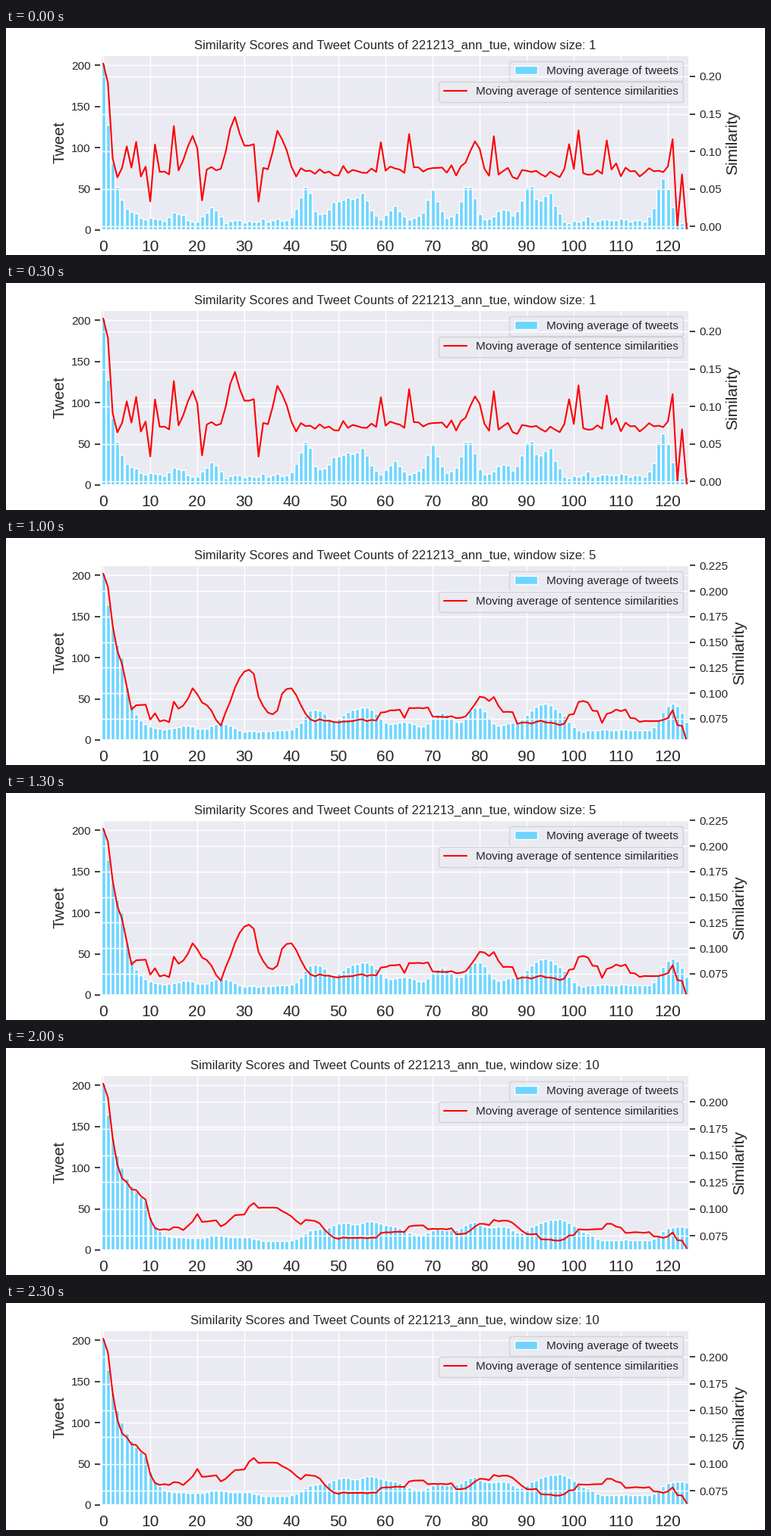
Write a matplotlib script that moves like this. It is 1000x300 px and loops after 2.5 s.

```python
import matplotlib.pyplot as plt
import numpy as np
from matplotlib.animation import FuncAnimation

INK = ".15"
plt.rcParams.update({
    "font.family": "Liberation Sans", "font.size": 12, "text.color": INK,
    "axes.facecolor": "#EAEAF2", "axes.edgecolor": "white", "axes.linewidth": 1.25,
    "axes.labelcolor": INK, "axes.labelsize": 15, "axes.titlesize": 12,
    "axes.grid": True, "axes.axisbelow": True,
    "grid.color": "white", "grid.linewidth": 1,
    "lines.linewidth": 1.5, "lines.solid_capstyle": "round",
    "patch.linewidth": 1, "patch.edgecolor": "white", "patch.force_edgecolor": True,
    "xtick.bottom": False, "xtick.color": INK, "xtick.labelsize": 15,
    "ytick.color": INK, "ytick.labelsize": 11,
    "xtick.major.size": 6, "ytick.major.size": 6, "ytick.major.width": 1.25,
    "legend.fontsize": 11,
})

# Window size and the lowest smoothed similarity, which sets the right axis
WINDOWS = [(1, 0.006), (3, 0.0385), (5, 0.062), (7, 0.0675), (10, 0.069)]
TOP_TWEETS, TOP_SIMILARITY = 202, 0.2175
MARGIN = 0.05

x = np.arange(125)
rng = np.random.default_rng(7)


def bumps(peaks, width):
    """Sum of bell curves given as (centre, height)."""
    return sum(h * np.exp(-((x - c) / width) ** 2) for c, h in peaks)


def jitter(spread):
    """Random wobble that leaves the opening peak untouched."""
    return np.where(x > 1, rng.normal(0, spread, x.size), 0)


def make_tweets():
    bursts = [(16, 10), (23, 15), (43, 40), (48.5, 14), (51.5, 26), (55, 31),
              (62, 17), (70, 35), (77.5, 44), (85, 15), (90.5, 42), (94.7, 32),
              (119, 50)]
    decay = (TOP_TWEETS - 12) * np.exp(-x / 2)
    return np.maximum(12 + decay + bumps(bursts, 1.9) + jitter(2), 4)


def make_similarity():
    swells = [(19, 50), (27.8, 72), (31.6, 42), (37.6, 52), (79, 30)]
    spikes = [(5, 37), (7, 38), (10, -48), (11, 36), (15, 54), (21, -60),
              (33, -72), (59, 39), (65, 56), (83, 42), (99, 36), (101, 59),
              (107, 39), (121, 43), (122, -62), (124, -68)]
    opening = bumps([(0.4, 168)], 1)
    return (74 + opening + bumps(swells, 1.8) + bumps(spikes, 0.45) + jitter(5)) / 1000


def moving_average(values, window):
    """Trailing mean; the first points use whatever history exists."""
    return [values[max(0, i - window + 1):i + 1].mean() for i in x]


tweets = make_tweets()
similarity = make_similarity()
fig = plt.figure(figsize=(10, 3), dpi=100)


def draw(frame):
    window, low = WINDOWS[frame]
    fig.clear()

    ax = fig.add_subplot()
    ax.bar(x, moving_average(tweets, window), color="#6ed5ff",
           label="Moving average of tweets")
    ax.set_xlim(-0.5, x.size - 0.5)
    ax.set_ylim(0, TOP_TWEETS * (1 + MARGIN))
    ax.set_xticks(range(0, x.size, 10))
    ax.set_ylabel("Tweet")
    ax.set_title("Similarity Scores and Tweet Counts of 221213_ann_tue, "
                 f"window size: {window}")
    ax.legend(loc="upper right")

    ax2 = ax.twinx()
    ax2.plot(x, moving_average(similarity, window), color="red",
             label="Moving average of sentence similarities")
    pad = MARGIN * (TOP_SIMILARITY - low)
    ax2.set_ylim(low - pad, TOP_SIMILARITY + pad)
    ax2.set_ylabel("Similarity")
    ax2.legend(loc="upper right", bbox_to_anchor=(1, 0.88))
    return []


anim = FuncAnimation(fig, draw, frames=len(WINDOWS), init_func=lambda: [],
                     interval=500, repeat=True, repeat_delay=0)
plt.show()
```
